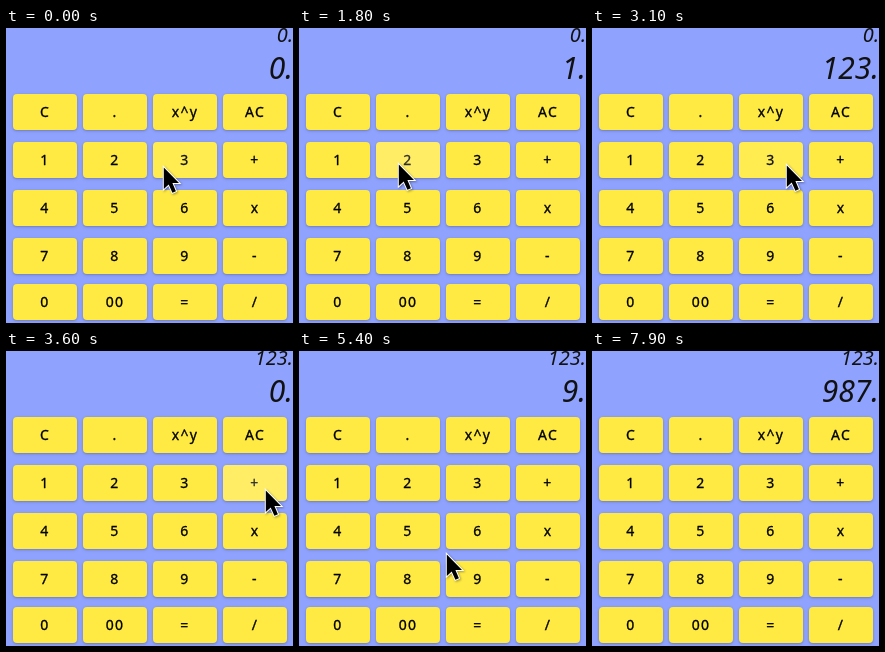
These frames come from a looping animation (287x295 px, 8 s). An HTML page:

```html
<!DOCTYPE html>
<html lang="en">
<head>
<meta charset="utf-8">
<title>Calculator</title>
<style>
  html, body { margin: 0; width: 100%; height: 100%; overflow: hidden; }
  body {
    position: relative; background: #8fa2fd; color: #111;
    font-family: "Noto Sans", sans-serif;
  }
  .line {
    position: absolute; right: 0; white-space: nowrap;
    font-style: italic; font-weight: 300;
  }
  #memory { top: -7px; font-size: 20px; line-height: 27px; }
  #entry { top: 19px; font-size: 30px; line-height: 41px; }
  .key {
    position: absolute; width: 64px; height: 36px; border-radius: 4px;
    background: #ffea43; color: #000; text-align: center;
    font-size: 14px; font-weight: 500; line-height: 36px; letter-spacing: 1.25px;
    -webkit-text-stroke: .3px #000;
    box-shadow: 0 1px 2px rgba(0, 0, 0, .14), 0 1px 4px rgba(0, 0, 0, .1);
  }
  .key::after {
    content: ""; position: absolute; inset: 0; border-radius: 4px;
    background: #fff; opacity: var(--glow, 0);
  }
  #cursor {
    position: absolute; left: 0; top: 0; overflow: visible;
    filter: drop-shadow(1px 1px 1px rgba(0, 0, 0, .35));
  }
</style>
</head>
<body>
<div id="memory" class="line"></div>
<div id="entry" class="line"></div>
<svg id="cursor" width="18" height="29">
  <path d="M.8 1.5V23L5.7 18.4 9.4 26.8 12.9 25.3 9.4 17H16Z"
    stroke="#fff" stroke-width="2" paint-order="stroke"/>
</svg>
<script>
const LOOP = 8000, STEP = 100, HIDE = 7900;
const $ = id => document.getElementById(id);
const memory = $("memory"), entry = $("entry"), cursor = $("cursor");

const rows = ["C . x^y AC", "1 2 3 +", "4 5 6 x", "7 8 9 -", "0 00 = /"];
const keys = rows.flatMap((row, r) => row.split(" ").map((label, c) => {
  const el = document.createElement("div");
  const x = 7 + 70 * c, y = Math.min(66 + 48 * r, 256);
  el.className = "key";
  el.textContent = label;
  el.style.left = x + "px";
  el.style.top = y + "px";
  document.body.insertBefore(el, cursor);
  return { el, label, x, y };
}));

// The first four are clicked, the rest come from the keyboard.
const inputs = [
  { at: 1500, key: "1" }, { at: 1900, key: "2" }, { at: 2500, key: "3" }, { at: 3500, key: "+" },
  { at: 5400, key: "9" }, { at: 5800, key: "98"[1] }, { at: 6200, key: "7" }
];
const clicks = inputs.slice(0, 4);

// Each move runs from one time to another and ends at x, y.
const home = { x: 157, y: 138 };
const moves = [
  { from: 1000, to: 1400, x: 40, y: 137 },
  { from: 1500, to: 1800, x: 99, y: 135 },
  { from: 1900, to: 2200, x: 182, y: 137 },
  { from: 2900, to: 3100, x: 194, y: 136 },
  { from: 3100, to: 3400, x: 259, y: 138 },
  { from: 3800, to: 4200, x: 147, y: 158 },
  { from: 4200, to: 4400, x: 147, y: 202 },
  { from: 7600, to: 7700, x: 101, y: 177 },
  { from: 7700, to: 7800, x: 231, y: 192 }
];

function pointer(t) {
  let { x, y } = home;
  for (const m of moves) {
    const k = Math.min(1, Math.max(0, (t - m.from) / (m.to - m.from)));
    x += (m.x - x) * k;
    y += (m.y - y) * k;
  }
  return { x, y };
}

function glow(key, p, t) {
  const over = p.x >= key.x && p.x < key.x + 64 && p.y >= key.y && p.y < key.y + 36;
  if (!over || t >= HIDE) return 0;
  const pressed = clicks.some(c => c.key === key.label && t >= c.at - 100 && t < c.at + 300);
  return pressed ? 0.18 : 0.07;
}

function draw(now) {
  const t = Math.floor(now % LOOP / STEP) * STEP;
  const typed = inputs.filter(i => i.at <= t).map(i => i.key).join("");
  const [first, second] = typed.split("+");
  const added = second !== undefined;
  memory.textContent = (added ? first : "0") + ".";
  entry.textContent = ((added ? second : first) || "0") + ".";

  const p = pointer(t);
  for (const key of keys) key.el.style.setProperty("--glow", glow(key, p, t));
  cursor.style.transform = `translate(${p.x}px, ${p.y}px)`;
  cursor.style.visibility = t < HIDE ? "visible" : "hidden";
}

const begin = performance.now();
function tick() {
  draw(performance.now() - begin);
  requestAnimationFrame(tick);
}
tick();
</script>
</body>
</html>
```
